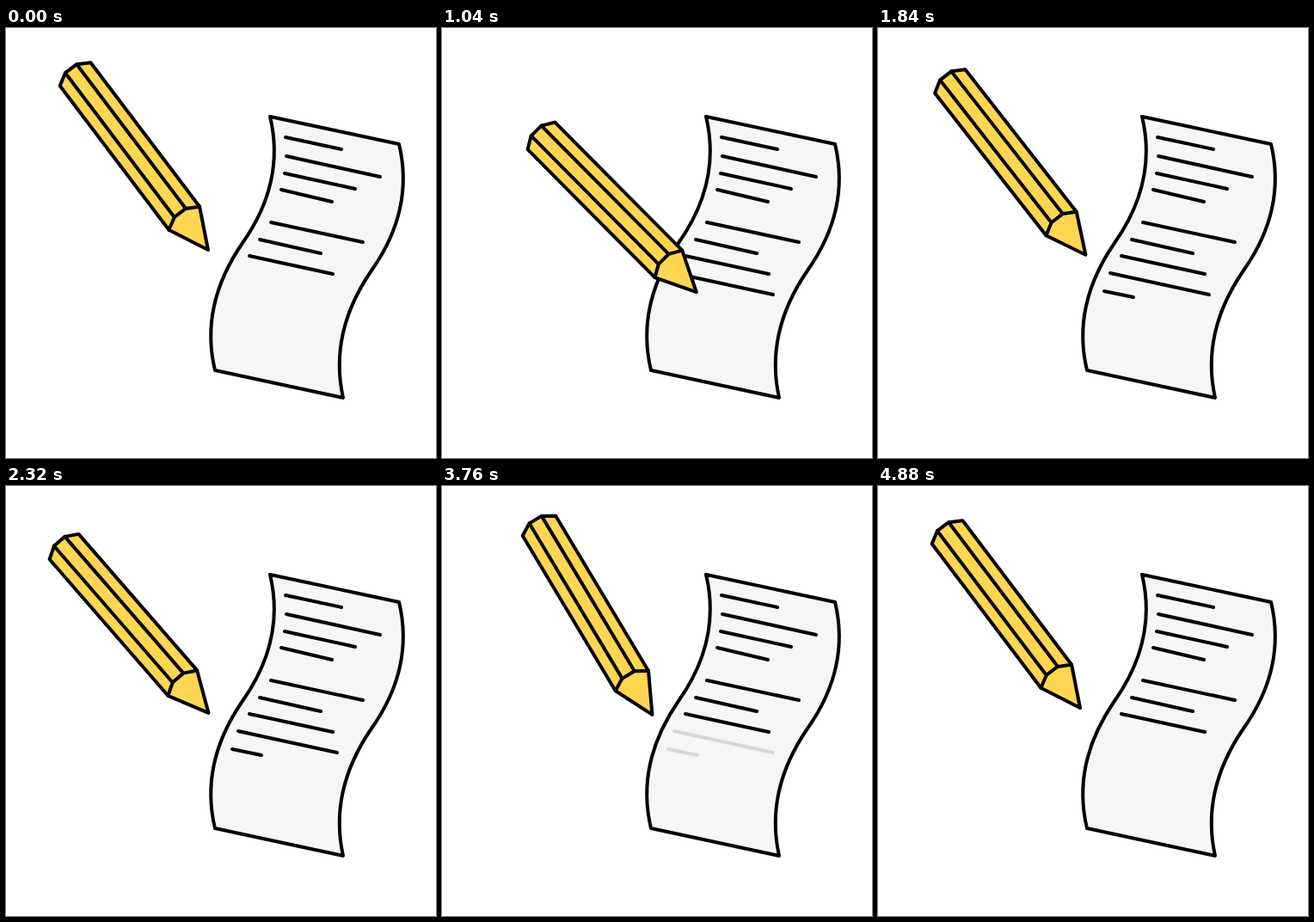
These frames come from a looping animation (500x500 px, 4960 ms). An HTML page:

```html
<!DOCTYPE html>
<html lang="en">
<head>
<meta charset="utf-8">
<title>Pencil writing on a page</title>
<style>
  html, body { margin: 0; width: 100%; height: 100%; overflow: hidden; background: #fff; }
  svg { display: block; width: 100%; height: 100%; }
  path { fill: none; stroke: #000; stroke-width: 4; stroke-linecap: round; stroke-linejoin: round; }
  .paper { fill: #f6f6f6; }
  .wood { fill: #ffd651; }
</style>
</head>
<body>
<svg viewBox="0 0 500 500">
  <path class="paper" d="M307 103L457 135C470 189 456 238 425 282C394 327 380 376 392 430L243 398C230 344 244 295 275 250C306 206 320 157 307 103Z"/>
  <path d="M325 127L390 141M326 149L435 173M324 169L406 187M320 188L379 202M308 226L415 249M295 246L366 262M283 265L380 286"/>
  <g id="ink">
    <path id="line1"/>
    <path id="line2"/>
  </g>
  <g id="pencil">
    <path class="wood" d="M0 0L22.4 -46L22.4 -256L8.3 -264.3L-8.3 -264.3L-22.4 -256L-22.4 -46Z"/>
    <path d="M-22.4 -46L-8.3 -54L8.3 -54L22.4 -46M-8.3 -54V-264.3M8.3 -54V-264.3"/>
  </g>
</svg>
<script>
const LOOP = 4960, STEP = 80;

// time, tip x, tip y, lean to the left in degrees
const keys = [
  [0, 235, 258, 37.1],
  [80, 235, 258, 37.1],
  [320, 270, 285, 37],
  [330, 270, 285, 37],
  [730, 385, 310, 14.3],
  [1200, 263, 306, 56],
  [1520, 297, 313, 49],
  [1920, 235, 258, 37.1],
  [2800, 236, 271.5, 46.1],
  [2880, 236, 271.5, 46.1],
  [3440, 240, 268, 35.6],
  [3960, 246, 264.5, 29.6],
  [4560, 236, 259.3, 35.9],
  [4860, 235, 258, 37.1],
  [LOOP, 235, 258, 37.1]
];

const strokes = [
  { id: 'line1', from: [270, 285], to: [385, 310], start: 330, end: 730 },
  { id: 'line2', from: [263, 306], to: [297, 313], start: 1200, end: 1520 }
];
const fade = { start: 3200, end: 3840 };

const get = id => document.getElementById(id);
const clamp = v => Math.min(1, Math.max(0, v));

function slope(i, c) {
  const a = keys[i], b = keys[i + 1];
  return a && b ? (b[c] - a[c]) / (b[0] - a[0]) : 0;
}

// Flat at turning points, harmonic mean elsewhere
function tangent(i, c) {
  const a = slope(i - 1, c), b = slope(i, c);
  return a * b > 0 ? 2 * a * b / (a + b) : 0;
}

function sample(t, c) {
  let i = 0;
  while (i < keys.length - 2 && t >= keys[i + 1][0]) i++;
  const a = keys[i], b = keys[i + 1], span = b[0] - a[0];
  const p = (t - a[0]) / span, q = 1 - p;
  return a[c] + (b[c] - a[c]) * p * p * (3 - 2 * p)
    + span * p * q * (q * tangent(i, c) - p * tangent(i + 1, c));
}

function draw(t) {
  const x = sample(t, 1), y = sample(t, 2), lean = sample(t, 3);
  get('pencil').setAttribute('transform', `translate(${x} ${y}) rotate(${-lean})`);

  for (const { id, from, to, start, end } of strokes) {
    const part = t >= end ? 1 : clamp((x - from[0]) / (to[0] - from[0]));
    const [ex, ey] = from.map((v, i) => v + (to[i] - v) * part);
    get(id).setAttribute('d', t > start ? `M${from}L${ex} ${ey}` : '');
  }
  get('ink').setAttribute('opacity', 1 - clamp((t - fade.start) / (fade.end - fade.start)));
}

const begin = performance.now();
function tick() {
  const t = (performance.now() - begin) % LOOP;
  draw(Math.floor(t / STEP) * STEP);
  requestAnimationFrame(tick);
}
tick();
</script>
</body>
</html>
```
